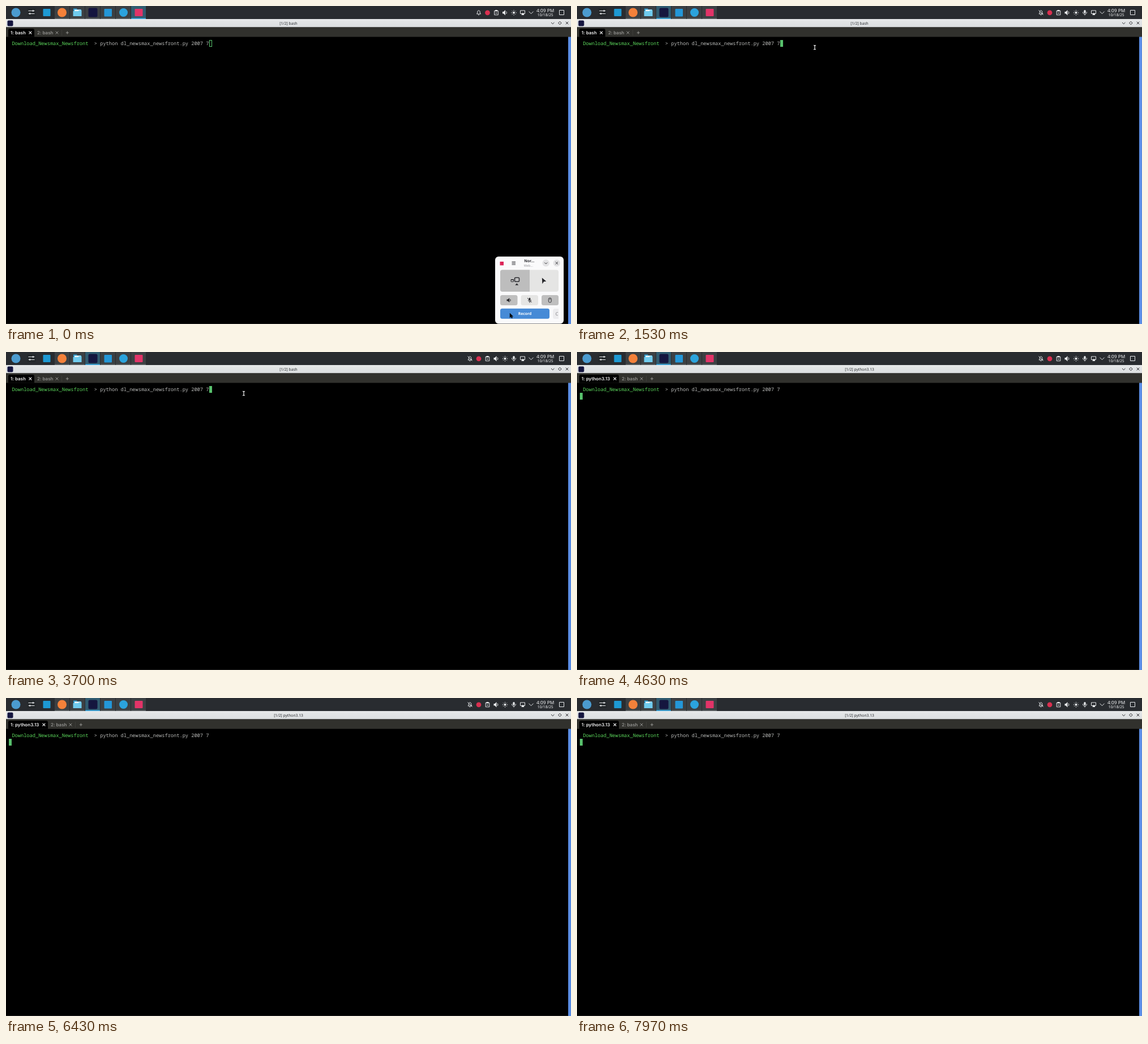
An HTML page that plays this animation: 998 px wide and 561 px high, repeating every 8 s.

```html
<!DOCTYPE html>
<html lang="en">
<head>
<meta charset="utf-8">
<title>Terminal session</title>
<style>
  html, body { margin: 0; width: 100%; height: 100%; overflow: hidden; background: #000; }
  svg { display: block; width: 998px; height: 561px; text-rendering: geometricPrecision; }
  text { font-family: "Noto Sans", sans-serif; white-space: pre; }
  .mid { text-anchor: middle; }
  .bold { font-weight: 700; }
  .tab { font: 600 8px Inter, sans-serif; }
  .mono { font: 8.667px "Noto Sans Mono", monospace; }
  .line { fill: none; stroke: #e6e8ea; stroke-width: 1; }
  .ink { fill: none; stroke: #2e2e33; stroke-width: 1; }
  .thick { stroke-width: 1.6; }
  .light { fill: #e6e8ea; }
</style>
</head>
<body>
<svg viewBox="0 0 998 561">
  <defs>
    <linearGradient id="bar" x2="0" y2="1">
      <stop stop-color="#e6e8e9"/><stop offset="1" stop-color="#dbdee0"/>
    </linearGradient>
    <clipPath id="rowEnd"><rect x="966" y="534" width="10" height="18"/></clipPath>
  </defs>

  <rect width="998" height="561"/>
  <rect y="560" width="993" height="1" fill="#1c1c1c"/>
  <rect x="993" y="54" width="5" height="507" fill="#5a8de4"/>

  <!-- taskbar -->
  <rect width="998" height="23" fill="#292c30"/>
  <g id="slots"></g>
  <circle cx="17.5" cy="11.5" r="8" fill="#4b9bcf"/>
  <rect x="37.5" y="4" width="15" height="14" rx="1" fill="#24282b"/>
  <path class="line" d="M39.5 8.5h11M39.5 13.5h11"/>
  <path class="light" d="M47 7h1.500v3h-1.500zM41.500 12h1.500v3h-1.500z"/>
  <rect x="65.5" y="5" width="13" height="13" rx="1" fill="#1d99d3"/>
  <circle cx="99" cy="11.5" r="8" fill="#f4813a"/>
  <path d="M119 4.500h6l1 1.500h7v6h-14z" fill="#2f9ed0"/>
  <path d="M121 6.500h11v5h-11z" fill="#f3f6f7"/>
  <path d="M118.500 9h9l1.500-1.500h4.500V18h-15z" fill="#6fcbee"/>
  <rect x="145.5" y="3.5" width="16" height="16" rx="2.5" fill="#15163f"/>
  <rect x="173.5" y="5" width="13.5" height="13.5" rx="1" fill="#2497d8"/>
  <circle cx="207.5" cy="11.5" r="7.5" fill="#2ba3dd"/>
  <rect x="227.5" y="5" width="14" height="13" rx="1" fill="#e23468"/>

  <!-- tray -->
  <g id="tray">
    <path class="line" d="M831.500 14c1.500-1.500 1.200-2.500 1.400-4 .3-2.700 3.900-2.700 4.200 0 .2 1.500 0 2.500 1.400 4zM834 15.700h2"/>
    <path id="mute" class="line" d="M831 7.500l8 8"/>
    <circle cx="850.5" cy="11.8" r="4.4" fill="#da3050"/>
    <path class="line" d="M862.700 8.500h6.600v7.200h-6.600zM864.500 12.500h3"/>
    <path class="light" d="M864 7h4v2.500h-4z"/>
    <path class="light" d="M877 10h2l3-3v9.500l-3-3h-2z"/>
    <path class="line" d="M883.500 9.500q2 2.200 0 4.500"/>
    <circle cx="897" cy="11.8" r="2" class="light"/>
    <path class="line" d="M897 7v1.500M897 15v1.500M892.300 11.800h1.500M900.300 11.800h1.500M893.700 8.500l1 1M899.300 14.100l1 1M893.700 15.100l1-1M899.300 9.500l1-1"/>
  </g>
  <g id="mic">
    <rect class="light" x="895.3" y="7" width="3.4" height="6" rx="1.7"/>
    <path class="line" d="M893.500 10.500c0 5.300 7 5.300 7 0M897 14.500v2"/>
  </g>
  <path class="line" d="M908.500 8h8v5.500h-8zM910.500 15.500h3"/>
  <path class="light" d="M911 12.500h4v3.500h-4z"/>
  <path class="line" d="M923.500 9.700l4 4 4-4M977.500 7.500h8v8h-8z"/>
  <text class="mid" x="952.7" y="11.3" font-size="8.3" fill="#f4f5f6">4:09 PM</text>
  <text class="mid" x="952.7" y="18" font-size="6.7" fill="#f4f5f6">10/18/25</text>

  <!-- window header -->
  <rect y="23" width="998" height="14.5" fill="url(#bar)"/>
  <rect x="2.5" y="25.5" width="10" height="10" rx="2" fill="#15163f"/>
  <text id="title" class="mid" x="499" y="32.7" font-size="6.7" fill="#2b2e31"></text>
  <path class="ink" d="M963 29l2.700 2.700 2.700-2.700M978.300 27.200l2.800 2.800-2.800 2.800-2.800-2.800zM988.700 27.700l4.600 4.600M993.300 27.700l-4.600 4.600"/>
  <rect y="37.5" width="998" height="17" fill="#31312d"/>
  <path id="tabShape"/>
  <text id="tabName" class="tab" x="8" y="49.8" fill="#f6f6f6"></text>
  <path id="tabClose" d="M40.500 44.700l4.800 4.800M45.300 44.700l-4.800 4.800" stroke="#eee" stroke-width="1.1"/>
  <g id="tabRest">
    <text class="tab" x="55" y="49.8" fill="#92928f">2: bash</text>
    <path d="M87.600 44.700l4.800 4.800M92.400 44.700l-4.800 4.800M105.800 47.100h5M108.300 44.600v5" stroke="#969693" fill="none"/>
    <path d="M98.500 42v10" stroke="#454541" stroke-width=".7"/>
  </g>

  <!-- terminal -->
  <text class="mono" x="10.4" y="68.8" fill="#5bd65b">Download_Newsmax_Newsfront<tspan fill="#b9bab8">  &gt; python dl_newsmax_newsfront.py 2007 7</tspan></text>
  <rect id="caret" width="4" height="11" stroke="#58c06c"/>

  <!-- recorder window -->
  <g id="panel">
    <rect x="864" y="442" width="121" height="118.5" rx="6" fill="#fafafb"/>
    <g id="setup">
      <rect x="872.5" y="451" width="6.5" height="6.5" fill="#dc2458"/>
      <path class="ink" d="M893.500 451.300h6.500M893.500 453.700h6.500M893.500 456.100h6.500"/>
      <text class="mid bold" x="924.3" y="451.8" font-size="6.8" fill="#2e2e33">Nor…</text>
      <text class="mid" x="922.8" y="459.8" font-size="5.6" fill="#98989c">Web…</text>
      <circle cx="953.7" cy="453.5" r="6.2" fill="#e3e3e5"/>
      <circle cx="972.8" cy="453.5" r="6.2" fill="#e3e3e5"/>
      <path class="ink" d="M951.200 452.500l2.500 2.500 2.500-2.500M970.600 451.300l4.400 4.400M975 451.300l-4.400 4.400"/>
      <rect x="873" y="465.5" width="103" height="38.5" rx="4" fill="#e5e5e4"/>
      <path d="M925 465.500h-48q-4 0-4 4v30.500q0 4 4 4h48z" fill="#bdbdbd"/>
      <rect class="ink" x="892" y="482.5" width="4.5" height="4" rx=".5"/>
      <rect class="ink thick" x="898.5" y="479.3" width="8" height="7" rx="1.5"/>
      <path d="M899.300 492.500l3-3.300 3 3.300zM892 482h4.500v1.500H892zM946.800 479.500l7.500 6.300-4.300.5-2.700 4z" fill="#242428"/>
      <rect x="873" y="510" width="30.5" height="18" rx="3.5" fill="#bfbfbf"/>
      <rect x="909.5" y="510" width="30.5" height="18" rx="3.5" fill="#e5e5e4"/>
      <rect x="946" y="510" width="30" height="18" rx="3.5" fill="#bfbfbf"/>
      <path d="M884.500 517.500h2l2.700-2.500v8l-2.700-2.500h-2z" fill="#242428"/>
      <path class="ink" d="M890.500 517q1.500 2 0 4M922.500 518.500c0 4 5 4 5 0M925 521.500v2M921 515l7.500 8"/>
      <rect x="923.7" y="514.7" width="2.6" height="5" rx="1.3" fill="#242428"/>
      <rect class="ink" x="958.3" y="515" width="5" height="8" rx="2.3"/>
      <path class="ink" d="M960.800 516v2.500"/>
      <rect x="873" y="533.7" width="87" height="18" rx="3.5" fill="#468ad6"/>
      <text class="mid bold" x="916.5" y="545.3" font-size="6.8" fill="#fff">Record</text>
      <g clip-path="url(#rowEnd)">
        <rect x="966" y="534" width="20" height="18" rx="3.5" fill="#ececee"/>
        <text x="970.5" y="546" font-size="8" fill="#85858a">C</text>
      </g>
    </g>
    <g id="recording">
      <text class="mid bold" x="924" y="474" font-size="8.8" fill="#2e2e33">Recording</text>
      <text class="mid" x="924.3" y="511" font-size="32" font-weight="200" fill="#c6102f">00:00</text>
      <rect x="873" y="533.7" width="103" height="18" rx="3.5" fill="#c8071f"/>
      <text class="mid bold" x="924.3" y="545.3" font-size="6.8" fill="#fff">Stop</text>
    </g>
  </g>

  <g id="pointer">
    <path id="arrow" d="M0 0v7.800l1.900-1.700 1.400 2.700 1.300-.7-1.300-2.500h2.400z" fill="#080808" stroke="#080808" stroke-width=".5"/>
    <path id="beam" d="M-2-3.700Q0-3.700 0-2.500Q0-3.700 2-3.700M0-2.500V2.500M-2 3.700Q0 3.700 0 2.500Q0 3.700 2 3.700" fill="none" stroke="#eee" stroke-width="1.2"/>
  </g>
</svg>
<script>
  const LOOP = 8000;
  const TIMES = { recordStart: 70, recordShown: 230, tray: 130, focus: 1230, enter: 3770, rename: 3840 };
  const PATH = [[0, 890, 542], [270, 890, 542], [800, 420, 72], [1100, 420, 72], [1180, 420, 73]];
  const el = Object.fromEntries([...document.querySelectorAll("[id]")].map(node => [node.id, node]));

  const set = (node, attrs) => {
    for (const key in attrs) node.setAttribute(key, attrs[key]);
  };
  const show = (node, on) => set(node, { visibility: on ? "visible" : "hidden" });
  const clamp = v => Math.min(1, Math.max(0, v));
  const smooth = v => v * v * (3 - 2 * v);

  const slots = Array.from({ length: 6 }, (_, i) => {
    const x = 86 + 27 * i;
    const addRect = (y, height) => {
      const rect = document.createElementNS(el.slots.namespaceURI, "rect");
      set(rect, { x, y, width: 26, height });
      el.slots.append(rect);
      return rect;
    };
    const body = addRect(0, 23), edge = addRect(21.5, 1.5);
    return active => {
      set(body, { fill: active ? "#315c70" : "#3c4043" });
      set(edge, { fill: active ? "#3daee9" : "#5d6265" });
    };
  });

  function pointerAt(t) {
    const i = PATH.findIndex(p => p[0] > t);
    if (i < 0) return PATH[PATH.length - 1].slice(1);
    const [t0, x0, y0] = PATH[i - 1], [t1, x1, y1] = PATH[i];
    const k = smooth((t - t0) / (t1 - t0));
    return [x0 + (x1 - x0) * k, y0 + (y1 - y0) * k];
  }

  function draw(t) {
    const focused = t >= TIMES.focus, entered = t >= TIMES.enter;
    const inTray = t >= TIMES.tray, renamed = t >= TIMES.rename;
    const shift = renamed ? 24 : 0;
    const process = renamed ? "python3.13" : "bash";

    slots.forEach((paint, i) => paint(i === (focused ? 2 : 5)));
    set(el.tray, { transform: `translate(${inTray ? -15.5 : 0})` });
    show(el.mute, inTray);
    show(el.mic, inTray);

    el.title.textContent = `[1/2] ${process}`;
    el.tabName.textContent = `1: ${process}`;
    set(el.tabShape, { d: `M4 54.500V43q0-3 3-3h${40 + shift}q3 0 3 3v11.500z` });
    set(el.tabClose, { transform: `translate(${shift})` });
    set(el.tabRest, { transform: `translate(${shift})` });

    set(el.caret, {
      x: entered ? 5.5 : 359.5,
      y: entered ? 72.5 : 60.5,
      fill: focused ? "#58c06c" : "none"
    });

    const fade = clamp((t - TIMES.recordStart) / (TIMES.recordShown - TIMES.recordStart));
    el.panel.style.display = focused ? "none" : "";
    set(el.setup, { opacity: 1 - fade });
    set(el.recording, { opacity: fade });

    const [x, y] = pointerAt(t);
    const overPanel = x > 864 && y > 442;
    set(el.pointer, { transform: `translate(${x} ${y})` });
    show(el.arrow, !entered && overPanel);
    show(el.beam, !entered && !overPanel);
  }

  function tick() {
    draw(performance.now() % LOOP);
    requestAnimationFrame(tick);
  }
  tick();
</script>
</body>
</html>
```
